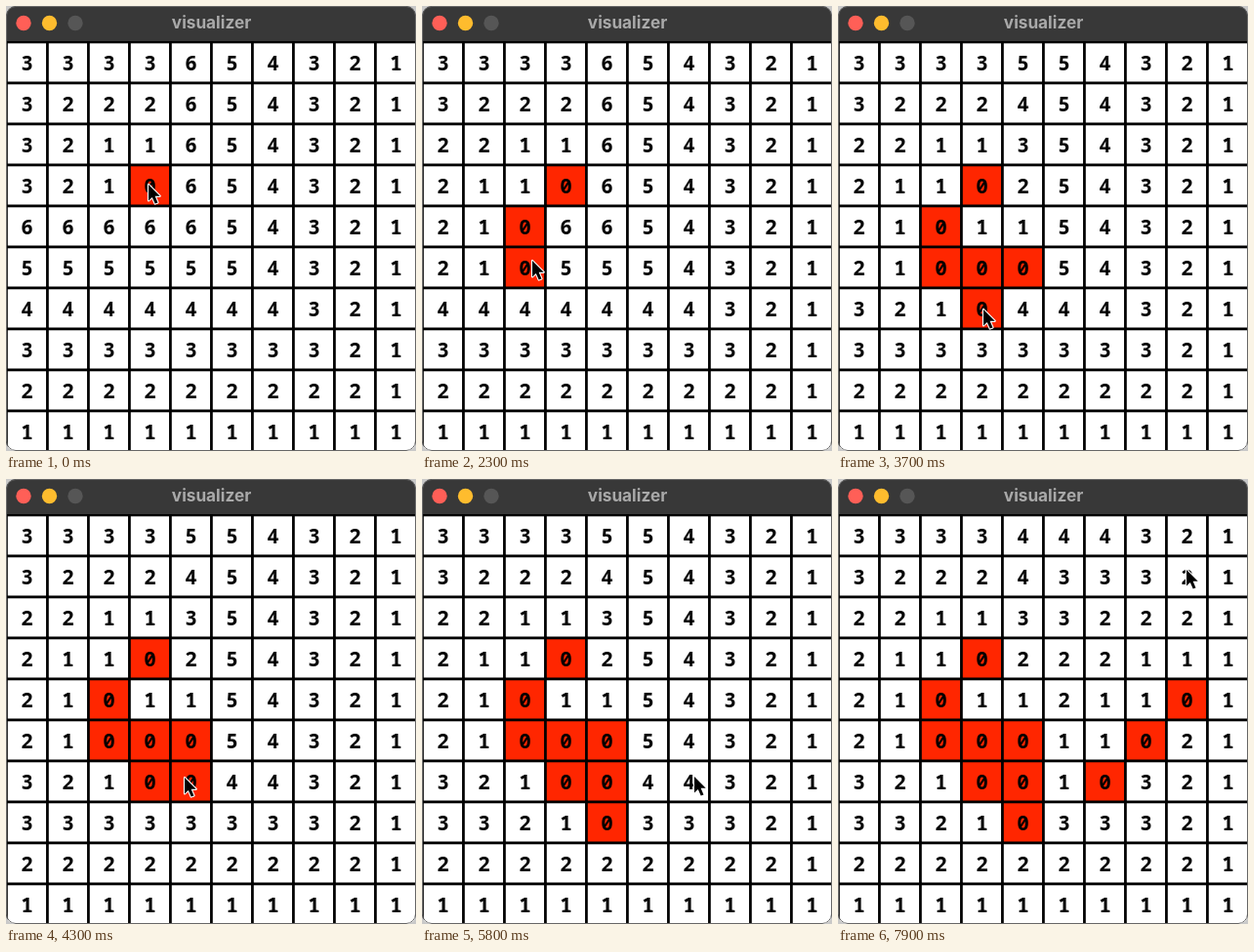
Write an HTML page that moves like this. It is 420 px wide and 456 px high and loops after 8000 ms.

```html
<!DOCTYPE html>
<html lang="en">
<head>
<meta charset="utf-8">
<title>visualizer</title>
<style>
  html, body { margin: 0; width: 100%; height: 100%; overflow: hidden; background: #c8c8c8; }
  svg { display: block; }
  .digit { font: 600 21px "Noto Sans Mono", "DejaVu Sans Mono", monospace; text-anchor: middle; }
  .title { font: 700 17.2px Inter, "Liberation Sans", sans-serif; text-anchor: middle; fill: #a9a9a9; }
</style>
</head>
<body>
<svg width="420" height="456" viewBox="0 0 420 456">
  <defs>
    <clipPath id="win"><rect width="420" height="456" rx="10"/></clipPath>
  </defs>
  <g clip-path="url(#win)">
    <rect width="420" height="456" fill="#fff"/>
    <g id="grid"></g>
    <rect width="420" height="36" fill="#383838"/>
    <g id="lights"></g>
    <text class="title" x="210.5" y="22.5">visualizer</text>
    <rect x=".5" y=".5" width="419" height="455" rx="9.5" fill="none" stroke="#666"/>
  </g>
  <path id="cursor" d="M0 0V16.5L3.8 12.9L6.7 19.6L9.5 18.4L6.6 11.8H11.7Z"
    fill="#000" stroke="#fff" stroke-width="2.2" stroke-linejoin="round" paint-order="stroke"/>
</svg>
<script>
const N = 10, CELL = 42, LEFT = 0.5, TOP = 37;
const LOOP = 8000, STEP = 100, REST = 100, MS_PER_PX = 8;
const NS = "http://www.w3.org/2000/svg";

// Clicks as time, x, y; the last one is only where the pointer is heading
const clicks = [
  [400, 146, 183], [1400, 114, 221], [2200, 113, 261], [2600, 148, 262],
  [3000, 183, 262], [3700, 149, 311], [4200, 183, 306], [4900, 183, 347],
  [5900, 279, 305], [6300, 314, 271], [7400, 354, 216], [LOOP, 357, 93]
];

function add(parent, tag, attrs) {
  const el = document.createElementNS(NS, tag);
  for (const k in attrs) el.setAttribute(k, attrs[k]);
  return parent.appendChild(el);
}

const lights = document.getElementById("lights");
["#ff5f57", "#febc2e", "#565656"].forEach((fill, i) =>
  add(lights, "circle", { cx: 18 + 26.5 * i, cy: 17.5, r: 7.7, fill }));

const grid = document.getElementById("grid");
const cursor = document.getElementById("cursor");
const cells = Array.from({ length: N * N }, (_, i) => {
  const x = LEFT + i % N * CELL, y = TOP + Math.floor(i / N) * CELL;
  return {
    box: add(grid, "rect", { x, y, width: CELL, height: CELL, stroke: "#000", "stroke-width": 2.6 }),
    label: add(grid, "text", { class: "digit", x: x + CELL / 2, y: y + 29 })
  };
});

const cellAt = ([, x, y]) =>
  Math.floor((y - TOP) / CELL) * N + Math.floor((x - LEFT) / CELL);

// Side of the largest free square whose top left corner is each cell
function squares(blocked) {
  const s = Array.from({ length: N + 1 }, () => Array(N + 1).fill(0));
  for (let r = N - 1; r >= 0; r--)
    for (let c = N - 1; c >= 0; c--)
      s[r][c] = blocked.has(r * N + c) ? 0
        : 1 + Math.min(s[r + 1][c], s[r][c + 1], s[r + 1][c + 1]);
  return s;
}

// Rest after a click, then ease to the next and wait there
function pointer(t, [t0, x0, y0], [t1, x1, y1]) {
  const time = Math.min(t1 - t0 - 2 * REST, MS_PER_PX * Math.hypot(x1 - x0, y1 - y0));
  const u = Math.min(1, Math.max(0, (t - t0 - REST) / time));
  const e = u * u * (3 - 2 * u);
  return [x0 + (x1 - x0) * e, y0 + (y1 - y0) * e];
}

function draw(t) {
  const next = Math.max(1, clicks.findIndex(k => k[0] > t));
  const blocked = new Set(clicks.slice(0, next).map(cellAt));
  const s = squares(blocked);
  cells.forEach(({ box, label }, i) => {
    box.setAttribute("fill", blocked.has(i) ? "#ff2600" : "#fff");
    label.textContent = s[Math.floor(i / N)][i % N];
  });
  const [x, y] = pointer(t, clicks[next - 1], clicks[next]).map(Math.round);
  cursor.setAttribute("transform", `translate(${x} ${y})`);
}

let last = -1;
function tick() {
  const t = Math.floor(performance.now() % LOOP / STEP) * STEP;
  if (t !== last) draw(last = t);
  requestAnimationFrame(tick);
}
tick();
</script>
</body>
</html>
```
